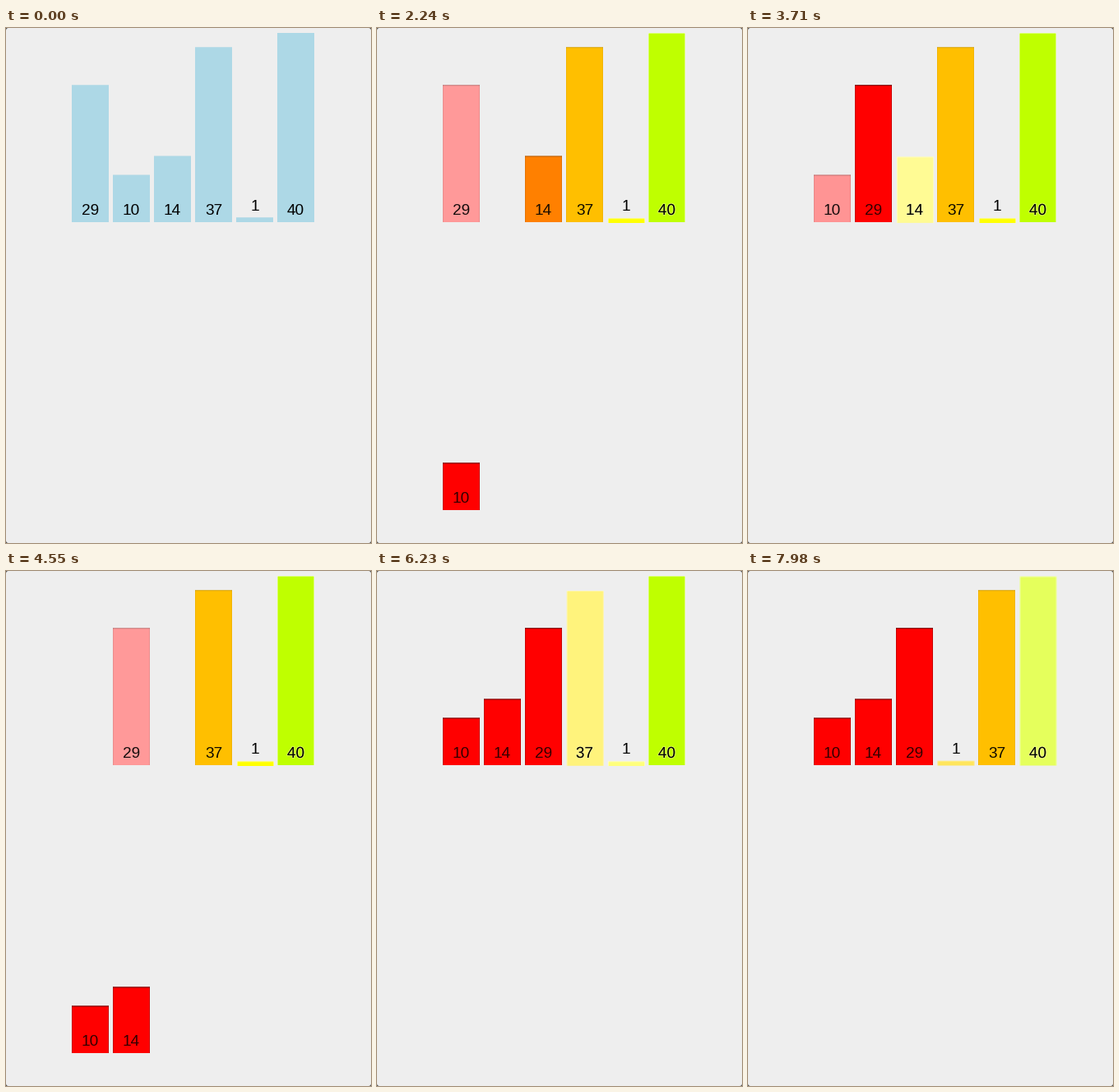
Recreate the animation shown at these times as a matplotlib script. Size 444 px wide and 626 px high, loop 8 s.

```python
import numpy as np
import matplotlib.pyplot as plt
from matplotlib.animation import FuncAnimation
from matplotlib.colors import to_rgb
from matplotlib.patches import FancyBboxPatch, Rectangle
import matplotlib.patheffects as pe

W, H, DPI = 444, 626, 100
LOOP, TICK, HOLD = 8000, 20, 70
MOVE = 250                      # length of one transition, ms
BAR_W, PITCH, LEFT, BASE, DROP, UNIT = 45, 50, 80, 236, 350, 5.75

VALUES = [29, 10, 14, 37, 1, 40]
HUES = ["#ff0000", "#ff4000", "#ff8000", "#ffbf00", "#ffff00", "#bfff00"]
RED, AMBER, PINK, PALE = HUES[0], HUES[3], "#ff9999", "#ffff99"
UP, DOWN = 0, 1


def pose(slot, row, color):
    return np.array([LEFT + PITCH * slot, DROP * row, *to_rgb(color)])


# Each step: start time, then bar index -> (slot, row, colour)
STEPS = [
    (1235, {i: (i, UP, c) for i, c in enumerate(HUES)}),
    # merge 29 | 10
    (1600, {0: (0, UP, PINK), 1: (1, UP, PALE)}),
    (1935, {1: (0, DOWN, RED)}),
    (2325, {0: (1, DOWN, RED)}),
    (2700, {1: (0, UP, RED)}),
    (3055, {0: (1, UP, RED)}),
    # merge 10 29 | 14
    (3440, {1: (0, UP, PINK), 2: (2, UP, PALE)}),
    (3790, {1: (0, DOWN, RED), 0: (1, UP, PINK)}),
    (4175, {2: (1, DOWN, RED)}),
    (4516, {0: (2, DOWN, RED)}),
    (4875, {1: (0, UP, RED)}),
    (5225, {2: (1, UP, RED)}),
    (5640, {0: (2, UP, RED)}),
    # merge 37 | 1
    (6000, {3: (3, UP, PALE), 4: (4, UP, PALE)}),
    (6368, {4: (3, DOWN, AMBER)}),
    (6695, {3: (4, DOWN, AMBER)}),
    (7105, {4: (3, UP, AMBER)}),
    (7460, {3: (4, UP, AMBER)}),
    # merge 1 37 | 40
    (7846, {4: (3, UP, PALE), 5: (5, UP, PALE)}),
]
STEPS = [(t0, {i: pose(*p) for i, p in moves.items()}) for t0, moves in STEPS]


def ease(u):
    u = min(max(u, 0), 1)
    return 4 * u**3 if u < 0.5 else 1 - 4 * (1 - u)**3


def clip(u):
    return min(max(u, 0), 1)


def poses(t):
    state = [pose(i, UP, "#add8e6") for i in range(len(VALUES))]
    for t0, moves in STEPS:
        if t <= t0:
            break
        k = ease((t - t0) / MOVE)
        for i, goal in moves.items():
            state[i] = state[i] + (goal - state[i]) * k
    return state


fig = plt.figure(figsize=(W / DPI, H / DPI), dpi=DPI, facecolor="#505050")
ax = fig.add_axes([0, 0, 1, 1])
ax.set(xlim=(0, W), ylim=(H, 0))
ax.axis("off")
ax.add_patch(FancyBboxPatch((0, 0), W, H, lw=0, fc="#eeeeee",
                            boxstyle="round,pad=0,rounding_size=3"))


class Bar:
    def __init__(self, value, z):
        self.h = value * UNIT
        self.body = self.rect(BAR_W, self.h, z)
        self.top = self.rect(BAR_W, 1, z + 0.1)
        self.sides = [self.rect(1, self.h, z + 0.1) for _ in range(2)]
        # a label that does not fit inside sits above the bar
        self.text_y = BASE - 9 if self.h > 20 else BASE - self.h - 8.5
        self.label = ax.text(0, 0, str(value), family="Liberation Sans",
                             size=19 * 72 / DPI, ha="center", va="baseline",
                             zorder=z + 0.2)

    @staticmethod
    def rect(w, h, z):
        return ax.add_patch(Rectangle((0, 0), w, h, lw=0, zorder=z, snap=False))

    def place(self, x, dy, r, g, b):
        shift = clip((r * g - 0.8) / 0.2)
        bx, by = x + shift, BASE - self.h + dy + shift
        self.body.set_xy((bx, by))
        self.body.set_facecolor((r, g, b))

        dark = 0.6 * max(r - g, 0)
        light = 0.45 * clip((g - 0.8) / 0.2) * clip((r - 0.7) / 0.05)
        edge = (1, 1, 1, light) if light > dark else (0, 0, 0, dark)
        side = edge if light > dark else (0, 0, 0, dark / 3)
        self.top.set_xy((bx, by))
        self.top.set_facecolor(edge)
        for part, dx in zip(self.sides, (0, BAR_W - 1)):
            part.set_xy((bx + dx, by))
            part.set_facecolor(side)

        self.label.set_position((x + BAR_W / 2, self.text_y + dy))
        self.label.set_alpha(1 - 0.2 * max(r - g, 0))
        halo = light if self.h > 20 else 0
        self.label.set_path_effects(
            [pe.withStroke(linewidth=1.5, foreground=(1, 1, 0.75), alpha=halo)]
            if halo > 0.05 else [])


bars = [Bar(v, 2 + i) for i, v in enumerate(VALUES)]


def update(frame):
    t = frame * TICK // HOLD * HOLD
    for bar, p in zip(bars, poses(t)):
        bar.place(*p)
    return []


anim = FuncAnimation(fig, update, frames=LOOP // TICK, interval=TICK,
                     init_func=lambda: update(0), repeat=True,
                     cache_frame_data=False)
plt.show()
```
